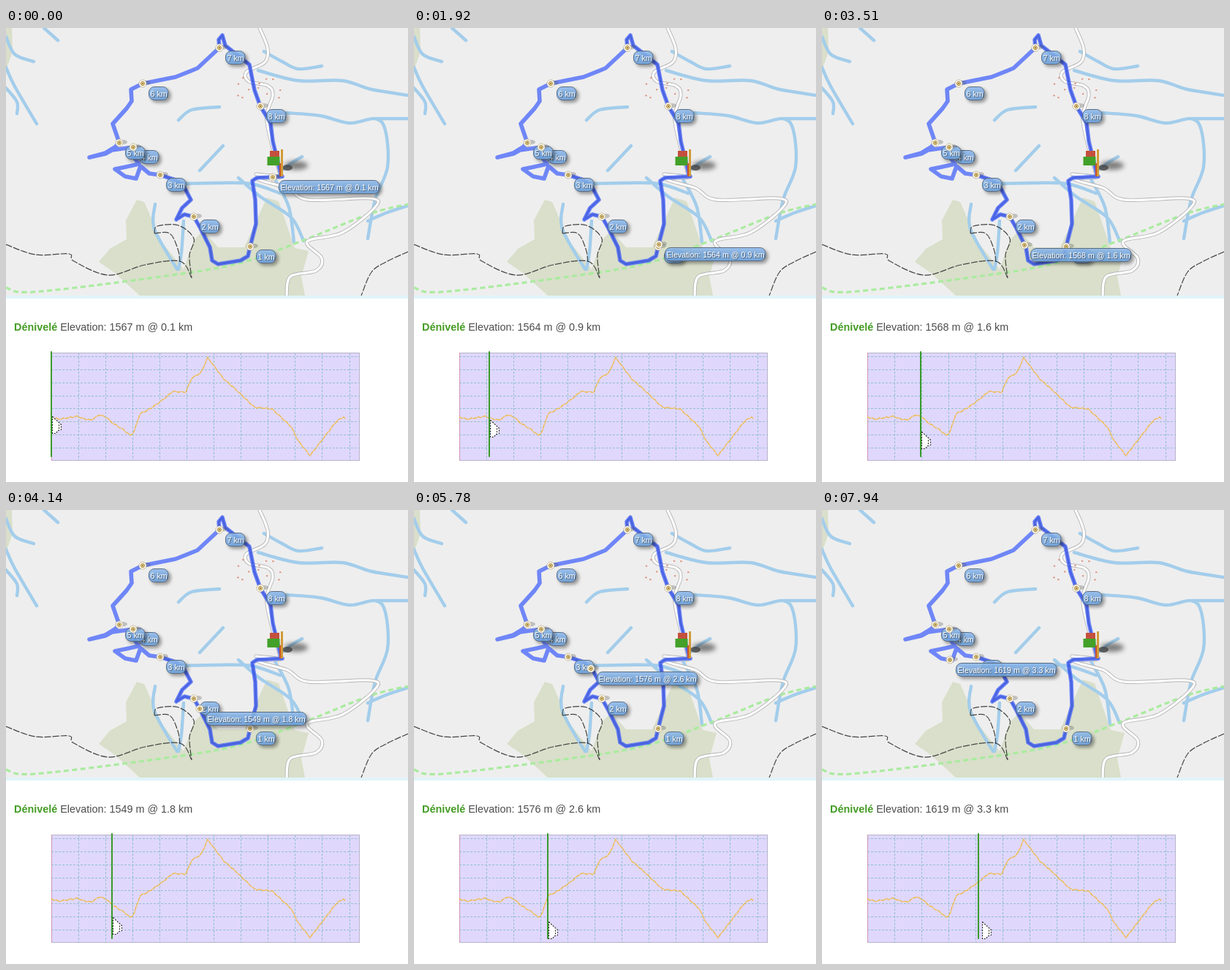
Animation, 550 px wide and 621 px high, one loop 8 s. Source, as an HTML page:

```html
<!DOCTYPE html>
<html lang="fr">
<head>
<meta charset="utf-8">
<title>Dénivelé</title>
<style>
html, body { margin: 0; width: 100%; height: 100%; overflow: hidden; background: #fff; }
svg { display: block; font-family: "Liberation Sans", Arial, sans-serif; }
path { fill: none; stroke-linejoin: round; stroke-linecap: round; }
.wood { fill: #d9dfca; }
.river { stroke: #a3cdeb; stroke-width: 4.4; }
.road { stroke: #b5b5b5; stroke-width: 5; }
.lane { stroke: #fff; stroke-width: 3.2; }
.edge { stroke: #444; stroke-width: 1.2; stroke-dasharray: 9 2; stroke-linecap: butt; }
.power { stroke: #aaeb9f; stroke-width: 3.2; stroke-dasharray: 7 4.5; stroke-linecap: butt; }
.route { stroke: #4463fb; stroke-width: 5.6; opacity: .74; }
.core { stroke: #2745cf; stroke-width: 3; opacity: .5; }
.house { stroke: #dd9880; stroke-width: 2.2; }
.grid { stroke: #7cbcc2; stroke-width: 1; stroke-dasharray: 3 2; stroke-linecap: butt; opacity: .8; }
.profile { stroke: #efbb45; stroke-width: 1.4; stroke-dasharray: 6 .8; stroke-linecap: butt; }
.hand { stroke: #222; stroke-width: 1.1; stroke-dasharray: 2 1.7; stroke-linecap: butt; }
.tag rect { fill: url(#sky); stroke: #5a6c82; filter: drop-shadow(3px 3px 2px rgba(0,0,0,.42)); }
.tag text { font-size: 10.67px; fill: #fff; text-shadow: 1px 1px 1px #456; }
</style>
</head>
<body>
<svg width="550" height="621" viewBox="0 0 550 621">
  <defs>
    <linearGradient id="sky" x2="0" y2="1">
      <stop stop-color="#90bcef" stop-opacity=".86"/>
      <stop offset="1" stop-color="#6ea5e2" stop-opacity=".86"/>
    </linearGradient>
    <filter id="soft" x="-50%" y="-50%" width="200%" height="200%"><feGaussianBlur stdDeviation="3"/></filter>
    <clipPath id="frame"><rect width="550" height="366"/></clipPath>
    <g id="pin">
      <ellipse cx="6" cy="-1" rx="5" ry="3" fill="#555" opacity=".3"/>
      <circle r="5" fill="#fffdf2" stroke="#b9ad8c" stroke-width=".8"/>
      <circle r="2.6" fill="#f4d985" stroke="#a58a50"/>
      <circle r=".9" fill="#6b5a3a"/>
    </g>
  </defs>
  <rect width="550" height="370" fill="#e0f4f9"/>
  <g id="map" clip-path="url(#frame)"></g>
  <text x="11" y="414" font-size="14.4" fill="#4c4c4c"><tspan font-weight="bold" fill="#459c25">Dénivelé</tspan> <tspan id="info"></tspan></text>
  <g id="chart"></g>
  <path id="bar" d="M0 443V586" stroke="#399b2b" stroke-width="2" stroke-linecap="butt"/>
  <g id="hand">
    <path class="hand" d="M0 0L12 11V18L7 19.5L5 23H0Z" style="fill:#fff"/>
    <path class="hand" d="M9 11V18"/>
  </g>
  <g id="tips"></g>
</svg>
<script>
const $ = id => document.getElementById(id);
const LOOP = 8000;
const pairs = text => text.split(' ').map(p => p.split(',').map(Number));
const range = (n, f) => Array.from({ length: n }, (_, i) => f(i));
const mix = (a, b, p) => a + (b - a) * p;
const clamp = p => Math.min(1, Math.max(0, p));

// Value at x on a line through key points.
function level(keys, x) {
  const i = Math.max(1, keys.findIndex(k => k[0] >= x));
  const [a, b] = [keys[i - 1], keys[i]];
  return mix(a[1], b[1], clamp((x - a[0]) / (b[0] - a[0])));
}

// Point at a fraction of the length of a polyline.
function along(points, fraction) {
  const steps = points.slice(1).map((p, i) => Math.hypot(p[0] - points[i][0], p[1] - points[i][1]));
  let left = fraction * steps.reduce((a, b) => a + b), i = 0;
  while (i < steps.length - 1 && left > steps[i]) left -= steps[i++];
  return [0, 1].map(n => mix(points[i][n], points[i + 1][n], left / steps[i]));
}

// Smooth path through a few points.
function curve(text) {
  const p = pairs(text), at = i => p[Math.min(p.length - 1, Math.max(0, i))];
  const ctrl = (i, s) => [0, 1].map(n => at(i)[n] + s * (at(i + 1)[n] - at(i - 1)[n]) / 6);
  return p[0] + range(p.length - 1, i => `C${ctrl(i, 1)} ${ctrl(i + 1, -1)} ${p[i + 1]}`).join('');
}

const path = (cls, ...lines) => `<path class="${cls}" d="${lines.map(l => 'M' + l).join('')}"/>`;
const curves = (cls, ...lines) => path(cls, ...lines.map(curve));
const box = (x, y, w, h, fill) => `<rect x="${x}" y="${y}" width="${w}" height="${h}" fill="${fill}"/>`;
const pin = (x, y) => `<use href="#pin" x="${x}" y="${y}"/>`;

const pen = document.createElement('canvas').getContext('2d');
pen.font = '10.67px "Liberation Sans", Arial, sans-serif';
const tag = (x, y, text) => `<g class="tag" transform="translate(${x + 8.5} ${y + 4.5})">
  <rect width="${pen.measureText(text).width + 3.5}" height="18" rx="7.5"/><text x="2" y="13">${text}</text></g>`;

// One leg per kilometre.
const legs = [
  '378,203 343,205 337,209 341,235 342,268 334,299',
  '334,299 331,312 321,318 290,323 282,318 279,300 266,274 257,258',
  '257,258 244,255 233,262 241,246 253,235 244,218 232,208 211,201',
  '211,201 196,199 184,189 178,206 163,203 149,193 164,190 182,186 170,170 174,163',
  '174,163 145,167 136,172 114,177 136,171 149,163 155,157',
  '155,157 146,131 165,110 172,100 171,84 187,76',
  '187,76 232,67 262,55 292,27',
  '292,27 291,16 296,10 300,24 333,50 340,85 348,107',
  '348,107 362,130 365,155 376,200'].map(pairs);
const stops = legs.slice(1).map(leg => leg[0]);

const roads = [
  '347,0 358,28 354,47 329,60 332,73 358,79 365,92 357,128 376,204',
  '342,200 376,204 345,207 385,219 414,235 498,233 505,245 460,280 412,292 432,315 424,332 389,340 384,368'];

$('map').innerHTML = box(0, 0, 550, 366, '#eeeeee') +
  path('wood', '0,0 8,0 9,32 0,58Z',
    '127,320 142,302 165,289 164,263 179,235 189,238 214,294 243,330 257,290 270,277 290,300 326,300 357,232 373,237 395,301 414,305 404,340 409,366 183,366 149,335Z') +
  curves('river', '0,12 12,36 38,46', '0,54 12,80 42,131', '0,82 15,101 15,117', '52,0 71,17',
    '353,32 378,46 400,56 432,52', '345,58 400,72 460,72 500,84 550,92',
    '383,116 430,120 470,130 505,124 519,140 522,190 505,235 495,288', '505,124 550,124',
    '495,264 520,253 550,243', '236,126 254,112 292,108', '265,195 297,161',
    '240,213 288,212 335,213 375,226', '318,205 347,230 390,259 407,291', '368,207 387,245 394,293',
    '376,196 390,185 405,176', '204,241 203,275 234,330', '243,264 240,307 236,330') +
  curves('power', '0,355 38,361 205,341 318,322 408,290 498,254 550,241') +
  curves('edge', '0,296 40,310 86,309 93,319 140,338 190,324 238,319 254,342',
    '203,281 207,271 236,270 257,288 251,311 254,342', '203,281 224,281 235,302 238,320',
    '550,306 520,320 500,334 486,366') +
  curves('road', ...roads) + curves('lane', ...roads) +
  path('house', ...range(12, i => `${345 + 30 * Math.sin(i * 5.1)},${82 + 14 * Math.sin(i * 2.3)}h.5`)) +
  path('route', legs.flat().join(' ')) +
  path('core', legs.slice(0, 3).flat().join(' '), legs.slice(7).flat().join(' ')) +
  '<ellipse cx="397" cy="188" rx="16" ry="6" fill="#333" opacity=".6" filter="url(#soft)"/>' +
  '<ellipse cx="385" cy="191" rx="7" ry="4" fill="#444" opacity=".8"/>' +
  box(376, 166, 3, 37, '#d39a35') + box(361, 168, 13, 10, '#c4503d') +
  box(357.5, 176, 17, 12, '#43a129') + box(374, 185, 2, 18, '#c6532e') +
  stops.map(([x, y], i) => tag(x, y, `${i + 1} km`)).join('') +
  stops.map(p => pin(...p)).join('');

// Chart x against metres.
const profile = pairs('62,1567 72,1560 98,1569 104,1563 116,1557 125,1569 128,1574 138,1565 145,1549 161,1527 170,1510 175,1519 183,1576 197,1592 214,1619 228,1646 246,1644 254,1687 267,1705 276,1751 298,1685 314,1653 340,1597 364,1592 390,1537 400,1492 416,1447 435,1503 452,1553 463,1569');
const chartY = metres => 532 - (metres - 1567) / 2.27;
$('chart').innerHTML =
  '<rect x="62.5" y="444.5" width="421" height="147" fill="#e0d7fd" stroke="#b9b4c9"/>' +
  path('grid', ...range(11, i => `${Math.round(99 + i * 37.05) + .5},445V591`),
    ...range(8, i => `62,${Math.round(449 + i * 17.85) + .5}H483`)) +
  '<path d="M62.5 445V591" stroke="#d98aa8" stroke-dasharray="2 2"/>' +
  path('profile', range(202, i => {
    const x = 62 + i * 2;
    return `${x},${(chartY(level(profile, x)) + Math.sin(x * .7) * .7).toFixed(1)}`;
  }).join(' '));

// Time against bar x.
const drag = pairs('140,62 920,73 1350,94 1490,94 2930,125 4140,145 4810,161 5180,173 5530,158 5780,183 6670,183 7080,222 7320,219 7650,209 7930,214 8000,214');

function draw(t) {
  const x = Math.round(level(drag, t));
  const km = .1 + (x - 62) / 46.6;
  const leg = Math.floor(km);
  const [mx, my] = along(legs[leg], km - leg).map(Math.round);
  const text = `Elevation: ${Math.round(level(profile, x))} m @ ${Math.floor(km * 10) / 10} km`;
  const drop = clamp((x - 80) / 90);
  const handX = x + 1.5 + Math.max(0, Math.round((x - 200) / 4));
  const handY = Math.round(531 + 32 * drop * drop * (3 - 2 * drop)) + .5;
  $('info').textContent = text;
  $('bar').setAttribute('transform', `translate(${x})`);
  $('hand').setAttribute('transform', `translate(${handX} ${handY})`);
  $('tips').innerHTML = tag(mx, my, text) + pin(mx, my);
}

function tick(now) {
  draw(now % LOOP);
  requestAnimationFrame(tick);
}
draw(0);
requestAnimationFrame(tick);
</script>
</body>
</html>
```
